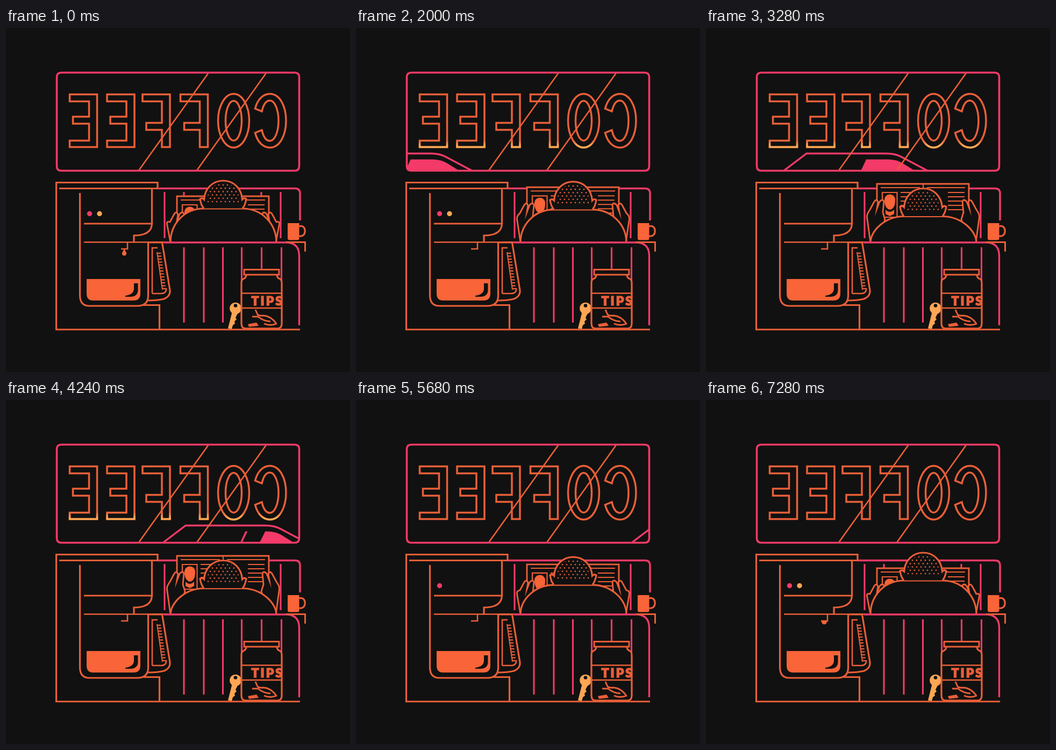
These frames come from a looping animation (640x640 px, 7.36 s). An HTML page with a canvas:

```html
<!DOCTYPE html>
<html lang="en">
<head>
<meta charset="utf-8">
<title>Diner</title>
<style>
html, body { margin: 0; width: 100%; height: 100%; overflow: hidden; background: #111; }
canvas { display: block; width: 640px; height: 640px; }
</style>
</head>
<body>
<canvas id="stage" width="640" height="640"></canvas>
<script>
const ctx = document.getElementById('stage').getContext('2d');
const LOOP = 7360, STEP = 80;
const BG = '#111111', ORANGE = '#f96438', STROKE = '#ea5f38', PINK = '#f33a68', YELLOW = '#fda654';

const clamp = v => Math.max(0, Math.min(1, v));
const ramp = (t, a, b) => clamp((t - a) / (b - a));
const ease = (t, a, b) => { const u = ramp(t, a, b); return u * u * (3 - 2 * u); };

function line(d, color = STROKE, width = 3.2) {
  ctx.strokeStyle = color;
  ctx.lineWidth = width;
  ctx.stroke(new Path2D(d));
}
function fill(d, color = ORANGE) {
  ctx.fillStyle = color;
  ctx.fill(new Path2D(d));
}
function shape(d, width) {
  fill(d, BG);
  line(d, STROKE, width);
}
function dot(x, y, r, color = ORANGE) {
  ctx.fillStyle = color;
  ctx.beginPath();
  ctx.arc(x, y, r, 0, Math.PI * 2);
  ctx.fill();
}
function clipped(d, draw) {
  ctx.save();
  ctx.clip(new Path2D(d));
  draw();
  ctx.restore();
}

// Mirrored sign letters, left to right
const letterE = x => `M${x} 123.5h51v98h-51v-12h36v-31.500h-30v-13h30v-28.500h-36z`;
const letterF = x => `M${x} 123.5h51v98h-15v-32h-29v-13h29v-40h-36z`;
const LETTERS = [
  letterE(118.5), letterE(188), letterF(254), letterF(324.5),
  'M394.5 172.5a29 50 0 0 1 58 0a29 50 0 0 1-58 0z M408.5 172.5a15 37 0 0 0 30 0a15 37 0 0 0-30 0z',
  'M463.5 150C468 132 479 122.5 491 122.5C509 122.5 521 145 521 172.5S509 222.5 491 222.5C479 222.5 468 213 463.5 195L476 190C479 203 484 210 491 210C500 210 507 193 507 172.5S500 135 491 135C484 135 479 142 476 155z'
];
const SIGN = 'M103 83H537Q545.5 83 545.5 91.5V257Q545.5 265.5 537 265.5H103Q94.5 265.5 94.5 257V91.5Q94.5 83 103 83z';

function drawCar(t) {
  const x = 145 + (t - 3280) * 0.1534;
  if (x > 560 || x < -330) return;
  clipped(SIGN, () => {
    ctx.save();
    ctx.translate(x, 0);
    line('M-1 266L42 233.500H190Q207 233.500 218 239.500L270 267', PINK, 3.4);
    fill('M143 266L153 244.500H194Q209 244.500 220 251L244 266z', PINK);
    ctx.restore();
    fill('M439.500 265L450 243H483L472 265z', BG);
  });
}

function drawSign(t) {
  drawCar(t);
  LETTERS.forEach(d => line(d, STROKE, 3.5));
  const glow = ctx.createLinearGradient(0, 209, 0, 219);
  glow.addColorStop(0, 'rgba(253,170,84,0)');
  glow.addColorStop(1, 'rgba(253,170,84,1)');
  LETTERS.forEach((d, i) => {
    const on = 640 + i * 275, off = 4300 + i * 210;
    ctx.globalAlpha = ramp(t, on, on + 160) * (1 - ramp(t, off, off + 200));
    if (ctx.globalAlpha > 0) clipped('M96 208H544V226H96z', () => line(d, glow, 3.5));
    ctx.globalAlpha = 1;
  });
  line('M376 84.500L247 265M483.500 84.500L355 265', STROKE, 2.7);
  line(SIGN, PINK, 3.6);
}

function drawUpperBench() {
  line('M282 298.500H538Q547 298.500 547 308V360', PINK, 3.5);
  line('M295 305V391M511 305V391M331 305V391M475 305V391', PINK, 3.1);
}

function drawPaper(p) {
  ctx.save();
  ctx.translate(0, p);
  shape('M318 290H489V364H318z', 2.9);
  line('M404 290V300M325 297H398M411 297H482', STROKE, 2);
  for (let y = 306; y < 346; y += 8) line(`M362 ${y}H396M450 ${y}H${y % 16 ? 481 : 475}`, STROKE, 2);
  line('M328 306H355.500V352H328z', STROKE, 2.2);
  fill('M332 320C332 306 352 306 352 320C352 328 350 337 342 338C335 337 332 328 332 320z');
  fill('M334 338Q342 346 350 338V346L342 350L334 346z');
  ctx.restore();
}

function drawArms(p) {
  const e = 352 + p * 0.55;
  const arm = `M306 399L299.500 ${e}Q299 ${e - 6} 305 ${338 + p}L313 ${323 + p}Q317 ${317 + p} 320 ${324 + p}L318 ${336 + p}
    L323 ${323 + p}Q329 ${317 + p} 331 ${323 + p}L329 ${343 + p}L333 ${356 + p}L320 399`;
  shape(arm, 2.9);
  ctx.save();
  ctx.translate(808, 0);
  ctx.scale(-1, 1);
  shape(arm, 2.9);
  ctx.restore();
}

function drawPerson(t) {
  const p = 23 - 23 * ease(t, 1180, 2430) + 23 * ease(t, 4880, 6150);
  const sink = 14.5 * (ease(t, 1640, 3200) - ease(t, 4920, 6560));
  const lean = -4 * ease(t, 320, 800) * (1 - ease(t, 960, 1500));
  const top = 336 + sink;
  drawPaper(p);
  drawArms(p);
  shape(`M306 399C306 ${top + 28} 332 ${top} 368 ${top}H440C476 ${top} 503 ${top + 28} 503 399`);
  ctx.save();
  ctx.translate(lean, sink);
  const head = 'M368 335.500Q363 330 361 318Q365 315 368.500 319C370 298 385 284 404 284S438 298 439.500 319Q443 315 447 318Q445 330 440 335.500';
  shape(head);
  clipped('M373 324C374 302 388 287 404 287S434 302 435 324L432 327H376z', () => {
    for (let row = 0; row < 6; row++)
      for (let x = 372 + (row % 2) * 4; x < 438; x += 8) dot(x, 292 + row * 6.2, 1.35, STROKE);
  });
  ctx.restore();
}

function drawLowerBench() {
  fill('M290 399H545V560H290z', BG);
  line('M266 398.500H303', STROKE, 2.5);
  line('M294 399H524Q545.500 401 545.500 424V553', PINK, 3.4);
  line('M331 408V548M368 408V548M403.500 408V548M438.500 408V548M475.500 408V548M512.500 408V548', PINK, 3.1);
}

function drawMug() {
  fill('M521 358H561V397H521z', BG);
  line('M521 398.500H556.500V416', STROKE, 3);
  fill('M524 363H545.500V391Q545.500 394.500 542 394.500H527.500Q524 394.500 524 391z');
  line('M545 369C560 364 560 391 545 387', STROKE, 3.2);
}

function drawJar() {
  const body = 'M447 459Q447 465 441 467Q438 469 438 474V550Q438 559 446 559H505Q513 559 513 550V474Q513 469 510 467Q504 465 504 459';
  shape(body);
  shape('M443 449.500H508V459H443z', 2.9);
  line('M438 493.500H513M438 521H513', STROKE, 2.6);
  clipped('M438 490H514V530H438z', () => {
    ctx.fillStyle = ctx.strokeStyle = STROKE;
    ctx.lineWidth = 1.4;
    ctx.lineJoin = 'miter';
    ctx.font = '900 23px Lato, "Open Sans", sans-serif';
    ctx.letterSpacing = '3px';
    ctx.textBaseline = 'alphabetic';
    ctx.fillText('TIPS', 456.5, 516);
    ctx.strokeText('TIPS', 456.5, 516);
  });
  line('M464 524L468 533Q471 536 479 535Q493 536 503 550M458 537H469Q478 545 492 546M480 550Q491 555 504 550', STROKE, 2.9);
  fill('M450 551L466 548L470 554L452 556z', STROKE);
}

function drawKey() {
  fill('M421 527L431 531L427 539L429 542L425 546L426 550L422 553L420 560L413 559z', YELLOW);
  dot(427, 521.500, 10.800, YELLOW);
  dot(427, 516.500, 3.300, BG);
}

function drawDrip(t) {
  const grow = ramp(t, 6880, LOOP);
  if (grow > 0) {
    const r = 6 * grow;
    fill(`M${220 - r} 411H${220 + r}Q${220 + r} ${411 + r * 1.2} 220 ${411 + r * 1.3}Q${220 - r} ${411 + r * 1.2} ${220 - r} 411z`);
  } else if (t < 400) {
    const y = 419.5 + 50 * (t / 400) ** 2;
    dot(220, y, 4);
    fill(`M216.500 ${y - 1.5}L220 ${y - 9}L223.500 ${y - 1.5}z`);
  }
}

function drawCoffee(t) {
  const amp = 8 * ease(t, 380, 720) * (1 - ease(t, 850, 1700));
  const shift = (t - 800) / 1000;
  let d = 'M150 467';
  for (let x = 150; x <= 250; x += 2) {
    const s = (x - 150) / 100;
    const y = 467 - amp * Math.sin(Math.PI * s) * (0.35 + Math.sin(2 * Math.PI * (s - 0.37 - shift)));
    d += `L${x} ${y.toFixed(2)}`;
  }
  fill(d + 'V494Q250 507 237 507H162Q150 507 150 494z');
  fill('M238 475H245.500V488Q245 499 233 500H222V498Q237 496 238 486z', BG);
}

function drawMachine(t) {
  fill('M93 287H282V299H272V399H292L304 500L264 508V516H285V560H93z', BG);
  line('M282 299V287.500H93.500V561H547');
  line('M99 298.500H283M271.500 299V364C271 380 258 386 238 386V398M145 364H271');
  line('M145 398.500H292', STROKE, 2.5);
  line('M137.500 307V498Q138 517 155 517H246Q264.500 516 264.500 498V399');
  line('M264 399H290.500L305 488Q306 499 294 504Q283 507 263 507M256 515.500H285.500V560');
  line('M272 494V409H282M272 494H288Q299 494 298 484', STROKE, 2.5);
  line('M281 417L291 487', STROKE, 2);
  for (let y = 419; y < 488; y += 5.5) {
    const x = 281 + (y - 417) * 0.143;
    line(`M${x} ${y}h7`, STROKE, 2.2);
  }
  line('M214 411H226V399', STROKE, 2.6);
  if (t < 2640 || t >= 5280) dot(155.500, 345.500, 4.700, PINK);
  if (t < 2640 || t >= 6480) dot(174, 345.500, 4.700, YELLOW);
  drawCoffee(t);
  drawDrip(t);
}

function draw(t) {
  ctx.fillStyle = BG;
  ctx.fillRect(0, 0, 640, 640);
  drawSign(t);
  drawUpperBench();
  drawPerson(t);
  drawLowerBench();
  drawMug();
  drawMachine(t);
  drawKey();
  drawJar();
}

const start = performance.now();
function tick() {
  const t = (performance.now() - start) % LOOP;
  draw(Math.floor(t / STEP) * STEP);
  requestAnimationFrame(tick);
}
tick();
</script>
</body>
</html>
```
